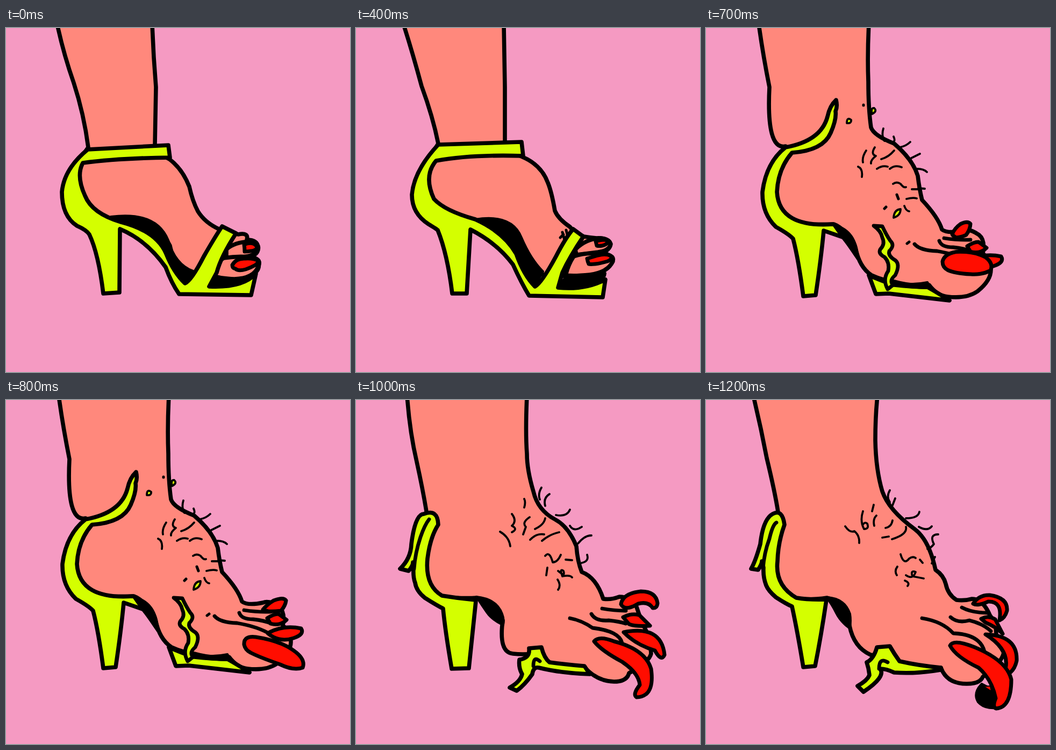
Recreate the animation shown at these times as an HTML page without scripts. Size 640 px wide and 640 px high, loop 1.3 s.

```html
<!DOCTYPE html>
<html lang="en">
<head>
<meta charset="utf-8">
<title>Heel</title>
<style>
html, body { margin: 0; width: 100%; height: 100%; overflow: hidden; background: #f59ac2; }
svg { display: block; width: 100vw; height: 100vh; }
/* poses a to f; each gap is drawn as two held steps */
path {
  --a: none; --b: none; --c: none; --d: none; --e: none; --f: none;
  fill: none; stroke: #000; stroke-width: 7.6; stroke-linejoin: round; stroke-linecap: round;
  animation: morph 1300ms steps(2, end) infinite;
}
.skin { fill: #ff887c; }
.lime { fill: #d4ff00; }
.nail { fill: #ff0d00; stroke-width: 7; }
.ink { fill: #000; stroke-width: 4; }
.hair { stroke-width: 3.8; }
.line { stroke-width: 6.8; }
.heel { animation-name: snap; }
@keyframes morph {
  0%, 15.3846% { d: var(--a); }
  30.7692% { d: var(--b); }
  46.1538% { d: var(--c); }
  61.5384% { d: var(--d); }
  76.923% { d: var(--e); }
  92.3076%, 100% { d: var(--f); }
}
/* the ankle strap whips back between d and e */
@keyframes snap {
  0%, 46.1538% { d: none; }
  61.5384% { d: var(--d); animation-timing-function: step-end; }
  69.2307% { d: var(--whip); animation-timing-function: step-end; }
  76.923% { d: var(--e); }
  92.3076%, 100% { d: var(--f); }
}
</style>
</head>
<body>
<svg viewBox="0 0 640 640">
<!-- leg and foot -->
<path class="skin" style="
--a:path('M95-8Q107 48 126 102Q145 160 153 222Q122 265 122 300Q125 340 165 356Q215 352 250 362Q290 375 305 405Q315 450 333 466Q360 460 388 463Q410 467 432 467Q475 460 470 436Q464 424 450 425Q470 424 469 408Q468 394 448 394Q452 380 432 384Q415 380 396 374Q370 362 357 341Q347 322 341 295Q328 262 304 244Q285 235 277 218Q278 160 279 110Q274 50 272-8');
--b:path('M88-8Q105 45 122 108Q143 165 153 215Q122 265 122 300Q125 335 180 345Q215 358 250 362Q295 375 312 410Q325 440 340 458Q365 460 392 462Q415 460 440 459Q472 452 477 432Q474 418 455 420Q472 414 474 402Q468 390 448 391Q436 390 424 388Q405 380 398 370Q376 355 370 340Q364 305 357 288Q345 255 310 240Q290 232 277 210Q277 160 277 110Q276 50 275-8');
--c:path('M94-8Q107 40 117 95Q136 205 153 212Q115 265 115 300Q125 340 180 352Q220 365 248 368Q290 380 305 410Q312 445 338 462Q370 440 395 448Q415 470 450 468Q510 460 508 418Q500 400 475 395Q472 374 462 374Q440 372 431 383Q428 395 418 398Q405 385 400 379Q420 372 416 354Q402 335 378 328Q392 290 378 260Q350 215 300 231Q297 215 294 200Q284 100 281-8');
--d:path('M98-8Q106 50 118 110Q112 228 148 220Q122 255 120 305Q130 360 165 365Q205 366 238 365Q272 385 278 408Q285 445 308 460Q330 470 350 472Q385 482 415 478Q430 498 450 500Q485 504 505 490Q530 470 530 450Q530 430 515 420Q520 395 508 385Q490 372 478 377Q450 383 439 375Q432 352 402 320Q397 300 394 275Q385 245 350 215Q312 200 307 185Q302 150 302 100Q300 50 303-8');
--e:path('M95-8Q100 60 113 115Q124 165 131 207Q118 270 120 310Q125 360 160 366Q200 370 224 368Q262 382 273 410Q265 470 292 472Q310 474 330 472Q370 500 425 497Q448 523 480 524Q504 524 508 508Q545 488 549 472Q548 450 540 430Q530 410 522 385Q510 366 490 366Q475 372 460 370Q447 330 420 320Q412 300 410 272Q395 235 370 222Q338 205 330 170Q318 130 318 100Q315 60 318-8');
--f:path('M88-8Q102 50 113 108Q128 170 134 208Q118 270 120 310Q125 360 160 370Q200 372 225 368Q258 375 267 420Q275 460 306 474Q325 478 345 478Q390 505 437 498Q448 528 485 528Q510 528 515 515Q550 490 554 470Q545 450 540 435Q540 415 528 400Q515 370 495 370Q480 374 466 372Q450 362 446 342Q442 326 427 316Q415 260 388 240Q340 205 328 170Q316 130 315 75Q315 30 319-8')"/>

<!-- insole and toes -->
<path class="ink" style="
--a:path('M378 482L392 462Q430 472 466 456Q450 482 378 482Z');
--b:path('M374 483L392 461Q430 462 464 456Q462 485 374 483Z');
--c:path('M366 484L386 452Q410 468 464 466Q455 486 366 484Z')"/>
<path class="skin" style="
--a:path('M410 412Q425 398 455 397Q472 402 469 412Q464 424 440 426L410 428Z');
--b:path('M408 412Q428 392 455 391Q475 393 473 404Q470 414 450 417L410 422Z');
--c:path('M426 412Q428 380 440 374Q462 368 470 382Q474 395 455 400L428 412Z')"/>
<path class="skin" style="
--a:path('M405 428Q430 424 452 426Q476 428 470 442Q462 466 425 467Q400 466 390 462Q385 440 405 428Z');
--b:path('M405 425Q425 418 450 420Q482 420 478 434Q468 455 435 459Q405 462 390 460Q395 440 405 425Z');
--c:path('M424 412Q440 400 470 405Q505 408 508 420Q502 462 455 468Q395 470 394 448Q398 420 424 412Z')"/>
<path class="ink" style="
--a:path('M195 351Q280 340 302 395Q315 440 348 452L333 476Q315 460 300 418Q270 375 195 351Z');
--b:path('M222 356Q290 345 308 390Q325 430 348 453L332 482Q312 455 300 425Q280 385 222 356Z');
--c:path('M248 368Q300 360 308 400Q312 450 348 461L333 484Q315 450 300 425Q280 395 248 368Z')"/>

<!-- whole shoe -->
<path class="lime" style="
--a:path('M152 226L302 218L305 241Q210 242 143 251Q130 275 147 312Q160 345 214 361Q280 378 298 420Q312 455 333 475Q345 470 368 425Q388 390 402 369L428 382Q400 425 392 455L378 481Q440 484 465 457L456 497L322 495Q308 475 297 445Q262 395 212 374L211 492L181 494Q172 420 155 384Q150 376 132 368Q104 350 104 305Q108 262 152 226Z');
--b:path('M153 217L308 212L311 238Q215 235 149 247Q125 275 145 318Q165 340 222 356Q275 380 298 420Q312 460 333 481Q345 475 372 425Q390 390 404 374L423 388Q398 425 384 455L376 483Q425 488 464 468L459 501L322 498Q308 475 292 440Q262 400 213 375L206 494L179 494Q170 420 152 376Q150 374 135 365Q104 345 104 310Q108 265 153 217Z');
--c:path('M150 217L297 208L299 231Q200 235 148 243Q140 280 155 315Q170 345 245 368Q275 390 298 425Q318 460 333 485Q345 480 372 430Q390 400 402 385L424 397Q400 425 385 455L367 483Q430 487 464 472L456 507L325 503Q312 475 290 445Q255 395 213 373L211 495L178 493Q170 430 158 392Q148 376 132 368Q104 345 104 310Q108 265 150 217Z')"/>

<!-- torn shoe -->
<path class="lime heel" style="
--d:path('M242 134Q230 145 226 165Q214 210 148 222Q112 250 105 305Q104 345 130 370Q155 384 162 392Q172 430 181 499L204 497Q214 430 219 377L268 394Q250 366 236 365Q136 372 132 305Q134 262 160 232Q218 228 232 195Q243 170 241 155Q245 146 242 134L242 134Z');
--whip:path('M63 232Q90 228 108 236Q122 242 118 256Q104 280 106 315Q107 350 128 369Q152 383 162 390Q169 430 180 499L207 498Q215 435 221 375L245 382Q220 368 195 366Q135 368 133 302Q136 258 154 236Q150 215 120 213Q95 205 80 208Q70 210 62 214L63 232Z');
--e:path('M98 318Q106 308 106 302Q108 305 107 312Q106 330 110 340Q112 355 128 368Q150 382 162 388Q166 430 178 500L210 499Q216 440 223 374L222 372Q190 369 160 364Q128 345 133 295Q138 255 153 232Q152 202 126 212Q110 212 103 268Q102 295 82 314L98 318Z');
--f:path('M97 316Q104 305 104 300Q106 305 107 312Q106 330 112 345Q116 355 130 367Q150 380 160 384Q170 430 181 497L203 495Q214 440 224 372L222 371Q190 372 168 368Q128 345 133 300Q134 265 146 232Q142 202 124 212Q106 222 101 268Q92 300 84 314L97 316Z')"/>
<path class="ink" style="
--d:path('M236 365Q268 374 277 400Q280 408 284 428L282 430Q262 400 255 392Q245 378 236 365Z');
--e:path('M224 366Q262 370 272 398Q276 408 274 418L272 418Q252 408 244 396Q234 382 224 366Z');
--f:path('M224 367Q258 368 268 398Q270 410 268 424L266 424Q250 412 242 396Q234 380 224 367Z')"/>
<path class="lime" style="
--d:path('M303 460Q325 470 350 478Q385 482 412 482Q430 492 453 507L340 494L316 495Z');
--e:path('M322 462L345 460Q350 480 360 488Q390 492 425 495L435 510Q380 508 340 498Q330 496 328 510Q314 530 299 541L286 535Q306 524 309 510Q302 498 304 483Q324 480 322 462Z');
--f:path('M318 460L342 458Q350 472 360 486Q395 494 437 498L437 502Q390 510 350 507Q335 500 324 500Q335 515 293 543L282 532Q300 522 304 512Q303 500 299 488Q312 482 318 460Z')"/>
<path class="lime line" style="
--d:path('M312 368Q326 378 328 390Q334 402 324 412Q320 420 332 426Q342 436 339 452Q328 468 338 486L348 478Q340 470 352 460Q362 440 352 432Q338 424 341 415Q352 404 343 396Q336 386 328 369Z')"/>
<path class="line" style="
--e:path('M108 314Q110 285 120 255Q128 232 136 222M330 495Q330 475 342 486');
--f:path('M106 314Q108 285 118 258Q124 232 131 228M322 500Q322 478 338 488')"/>
<path class="lime hair" style="
--d:path('M262 177Q262 165 270 171Q271 178 262 177ZM309 160Q306 148 313 149Q319 155 309 160ZM349 353Q350 338 362 337Q362 349 349 353Z')"/>

<!-- toe lines and nails -->
<path class="line" style="
--c:path('M427 406L421 427');
--d:path('M388 402Q398 414 430 415Q470 422 492 436M434 396Q438 408 460 408Q480 410 494 416M443 391Q470 395 492 394');
--e:path('M398 406Q420 410 440 424Q490 430 495 452M438 398Q446 412 470 410Q490 412 502 416M458 388Q480 392 502 392');
--f:path('M402 406Q440 412 460 434Q510 436 518 468M455 404Q468 416 490 410Q515 416 530 430M476 386Q495 396 524 396')"/>
<path class="nail" style="
--d:path('M486 406Q498 398 507 398L522 409Q510 421 492 416Z');
--e:path('M497 404Q512 396 527 400L547 420Q520 422 508 417Z');
--f:path('M512 407Q525 400 538 408L552 435Q540 422 520 414Z')"/>
<path class="nail" style="
--d:path('M487 434Q515 418 549 425Q556 436 535 443Q508 452 487 434Z');
--e:path('M498 432Q568 418 574 474Q568 488 556 466Q520 455 498 432Z');
--f:path('M520 436Q580 438 578 485Q573 509 552 514Q574 470 520 436Z')"/>
<path class="nail" style="
--a:path('M443 403Q452 399 460 401Q467 404 467 410Q462 415 455 415Q449 416 444 416Q444 409 443 403Z');
--b:path('M446 397Q455 394 462 394Q469 395 469 399Q464 404 458 405Q452 406 448 405Q447 401 446 397Z');
--c:path('M438 377Q440 364 448 357Q458 350 463 356Q463 368 456 378Q448 387 441 386Q437 382 438 377Z');
--d:path('M478 390Q486 380 498 373Q516 366 521 373Q520 382 512 392Q496 394 488 393Q482 392 478 390Z');
--e:path('M493 380Q496 360 530 356Q558 356 561 378Q560 388 552 387Q544 374 525 379Q500 394 493 380Z');
--f:path('M497 379Q508 362 528 363Q562 368 560 392Q556 406 546 410Q552 374 525 375Q505 384 497 379Z')"/>
<path class="ink" style="
--d:path('M345 472Q380 480 412 473L418 484Q380 484 345 477Z');
--f:path('M513 528Q496 545 506 562Q518 575 540 573L536 540Z')"/>
<path class="nail" style="stroke-width:2;--f:path('M517 533L529 532L531 542Z')"/>
<path class="nail" style="
--a:path('M421 441Q428 428 445 429Q460 428 470 433Q470 436 464 441Q455 446 446 449Q432 453 427 448Q421 447 421 441Z');
--b:path('M430 429Q440 426 450 423Q465 419 474 424Q478 430 468 434Q455 438 445 439Q435 440 433 439Q431 435 430 429Z');
--c:path('M437 414Q445 402 465 392Q490 382 505 387Q514 395 506 405Q490 415 475 424Q455 435 445 431Q435 426 437 414Z');
--d:path('M443 455Q442 438 465 441Q510 448 535 466Q558 482 552 498Q535 504 510 492Q470 478 455 470Q445 465 443 455Z');
--e:path('M443 449Q452 438 480 449Q538 464 549 500Q554 535 540 547Q532 553 522 553Q514 548 528 530Q526 508 495 487Q456 466 443 449Z');
--f:path('M454 457Q460 444 500 460Q560 485 568 520Q568 572 540 574Q532 572 539 555Q532 520 507 498Q465 478 454 457Z')"/>

<!-- wrinkles, stubble, hair -->
<path class="hair" style="stroke-width:5;
--b:path('M380 390L386 384M384 380L388 394M391 376L394 388');
--c:path('M287 254L291 252M290 273L294 270M302 259L310 254M317 262L321 261M323 249L328 247M340 262L343 263M346 250L349 251M360 369Q372 376 382 398M374 368Q382 380 388 394M388 368Q390 380 394 388M360 399Q372 404 382 410');
--d:path('M293 143v1M332 336L335 333M374 401L378 398M355 310L358 318')"/>
<path class="hair" style="
--c:path('M348 285v1');
--d:path('M330 187Q326 200 332 210M349 202Q354 213 344 212M380 212Q372 220 360 222M382 242L398 234M393 262Q405 262 411 268M395 298L407 299M298 228Q290 240 292 250M314 222Q306 235 316 238Q306 246 307 252M350 228Q340 240 326 244M318 262Q328 255 338 258M342 262Q352 254 364 259M283 258Q292 262 290 277M348 290Q355 285 362 290Q368 298 372 296M383 300L396 300M373 318Q385 315 392 317M369 331Q372 340 378 341');
--e:path('M345 163Q338 175 342 185M360 175Q348 182 352 197M398 204Q392 218 372 214M420 236Q405 246 398 234M438 252Q425 252 413 267M430 288Q434 300 420 303M313 184Q316 190 313 200M290 212Q300 225 290 234Q302 240 290 246M323 218Q308 228 316 236L311 250M352 220Q350 232 333 240M324 260Q335 248 350 250M346 262Q360 250 378 246M268 245Q285 255 287 272M352 290Q360 280 366 302Q375 302 381 288M390 297L402 298M356 312L354 326M376 318Q390 330 386 318Q378 312 384 328Q398 325 402 330M375 334Q382 345 376 353');
--f:path('M342 168Q335 180 342 190M352 183L347 196M397 208Q395 220 372 220M420 235Q412 245 396 236M432 250Q415 250 424 268Q418 276 412 277M426 292L420 304M312 195L309 207M292 207Q286 225 294 240Q304 240 300 230Q295 226 292 232M317 215Q310 222 313 234M347 224Q345 236 334 238M372 236Q375 250 346 259M328 256L340 254M259 235Q268 248 276 244Q286 252 285 266M362 287Q368 308 378 295Q385 290 390 294M398 297L403 303M356 310Q350 318 355 326M372 326Q385 335 390 320Q380 316 384 328Q395 330 405 332M370 336Q380 340 375 346')"/>
</svg>
</body>
</html>
```
